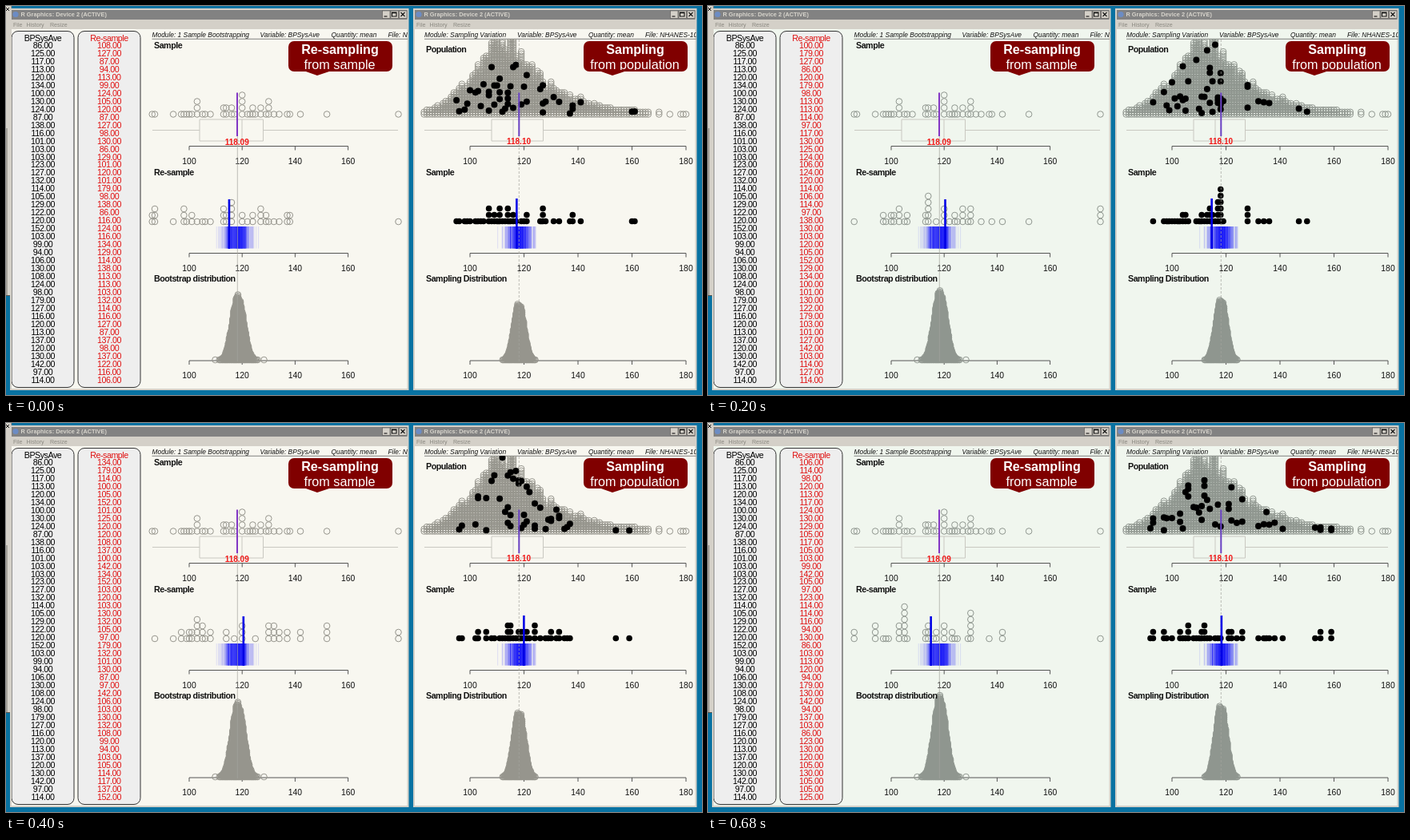
An HTML page that plays this animation: 870x487 px, repeating every 780 ms.

```html
<!DOCTYPE html>
<html lang="en">
<head>
<meta charset="utf-8">
<title>Bootstrap and sampling distributions</title>
<style>
html, body { margin: 0; width: 100%; height: 100%; overflow: hidden; background: #0872a2; }
svg { display: block; width: 870px; height: 487px; font-family: "Liberation Sans", Arial, sans-serif; }
.tight { letter-spacing: -0.045em; }
</style>
</head>
<body>
<svg id="stage" viewBox="0 0 870 487" xmlns="http://www.w3.org/2000/svg"></svg>
<script>
const NS = 'http://www.w3.org/2000/svg';
const stage = document.getElementById('stage');
const STEP = 40, LOOP = 780, STATES = 18;

// ---------- helpers ----------
function el(parent, tag, attrs = {}, text) {
  const node = document.createElementNS(NS, tag);
  for (const key in attrs) node.setAttribute(key, attrs[key]);
  if (text !== undefined) node.textContent = text;
  parent.appendChild(node);
  return node;
}
const rect = (p, x, y, w, h, fill, more) => el(p, 'rect', { x, y, width: w, height: h, fill, ...more });
const line = (p, x1, y1, x2, y2, stroke, w = 1, more) =>
  el(p, 'line', { x1, y1, x2, y2, stroke, 'stroke-width': w, ...more });
const path = (p, d, more) => el(p, 'path', { d, fill: 'none', ...more });
// y is the middle of the capital letters
const label = (p, s, x, y, size, more) =>
  el(p, 'text', { x, y: y + size * 0.36, 'font-size': size, fill: '#111', ...more }, s);
const mid = { 'text-anchor': 'middle' };
const bold = { 'font-weight': 'bold' };
const tight = { class: 'tight' };

function random(seed) {
  return () => {
    seed = (seed + 0x6D2B79F5) | 0;
    let t = Math.imul(seed ^ (seed >>> 15), 1 | seed);
    t = (t + Math.imul(t ^ (t >>> 7), 61 | t)) ^ t;
    return ((t ^ (t >>> 14)) >>> 0) / 4294967296;
  };
}
const gauss = rnd => Math.sqrt(-2 * Math.log(1 - rnd())) * Math.cos(2 * Math.PI * rnd());
const mean = list => list.reduce((a, b) => a + b, 0) / list.length;
const dot = (x, y, r = 3.8) =>
  `M${(x - r).toFixed(1)} ${y.toFixed(1)}a${r} ${r} 0 1 0 ${2 * r} 0a${r} ${r} 0 1 0 ${-2 * r} 0`;

const leftX = v => 229 + (v - 100) * 3.31;
const rightX = v => 580 + (v - 100) * 3.375;

function stacked(values, toX, base) {
  const seen = {};
  return values.map(v => {
    seen[v] = (seen[v] || 0) + 1;
    return dot(toX(v), base - (seen[v] - 1) * 8);
  }).join('');
}

// ---------- data ----------
const sample = ('86 125 117 113 120 134 100 130 124 87 138 116 101 103 103 123 127 132 114 105 129 122 ' +
  '120 152 103 99 94 106 130 108 124 98 179 127 116 120 113 137 120 130 142 97 114').split(' ').map(Number);

// height of the population pile at value v
const crowd = v => 97 * Math.exp(v < 115 ? -((v - 115) ** 2) / 338 : (115 - v) / 16);

function pickPopulation(rnd, count) {
  const picked = [];
  while (picked.length < count) {
    const v = 84 + Math.floor(rnd() * 83);
    if (rnd() * 97 < crowd(v)) picked.push(v);
  }
  return picked;
}

// ---------- windows ----------
const panels = [], greys = [];

function frameWindow(x, w, icon) {
  rect(stage, x, 3, w, 478, '#d4d0c8');
  rect(stage, x + 2, 5, w - 4, 12, '#828282');
  el(stage, 'circle', { cx: icon, cy: 10.5, r: 3.6, fill: '#6c8cc4' });
  label(stage, 'R Graphics: Device 2 (ACTIVE)', icon + 6.5, 10.5, 7.35, { fill: '#d8d5cd', ...bold });
  const b = x + w - 33;
  const glyphs = [`M${b + 2} 13h4`, `M${b + 12} 8h5.5v5h-5.5zM${b + 12} 8.6h5.5`, `M${b + 23} 8l5 5m0 -5l-5 5`];
  glyphs.forEach((d, i) => {
    rect(stage, b + i * 10.5, 6, 9.5, 9.5, '#d4d0c8', { stroke: '#55534f', 'stroke-width': 0.6 });
    path(stage, d, { stroke: '#111', 'stroke-width': 1.1 });
  });
  [['File', -3], ['History', 13.5], ['Resize', 43]].forEach(([s, dx]) =>
    label(stage, s, icon + dx, 23, 7.1, { fill: '#8b8981' }));
  panels.push(rect(stage, x + 2, 29, w - 4, 450, '#f8f7f0'));
}

rect(stage, 0, 0, 870, 487, '#0872a2');
rect(stage, 0, 0, 7, 363, '#d4d0c8');
line(stage, 6.8, 0, 6.8, 363, '#77746e', 0.8);
line(stage, 0, 362.5, 7, 362.5, '#55534f');
line(stage, 1, 153, 1, 362, '#77746e');
path(stage, 'M0 2l4 4m0 -4l-4 4', { stroke: '#111' });
frameWindow(5, 498.5, 12);
frameWindow(509, 354.5, 516);

const clip = (id, x, y, w, h) => rect(el(stage, 'clipPath', { id }), x, y, w, h, '#000');
clip('left', 7, 29, 495, 450);
clip('right', 511, 29, 351.5, 450);
clip('plot', 511, 41, 351, 110);
clip('note', 353, 44, 500, 36);
const left = el(stage, 'g', { 'clip-path': 'url(#left)' });
const right = el(stage, 'g', { 'clip-path': 'url(#right)' });

// ---------- value columns ----------
function column(x, head, fill) {
  const style = { fill, ...mid, ...tight };
  rect(left, x, 31.5, 78, 446, '#eeeeee', { rx: 8, stroke: '#333', 'stroke-width': 1 });
  label(left, head, x + 39, 40, 10.7, style);
  return sample.map((v, i) => label(left, v + '.00', x + 39, 49 + i * 9.976, 10.7, style));
}
column(7, 'BPSysAve', '#000');
const redCells = column(90, 'Re-sample', '#e01010');

// ---------- plots ----------
function header(p, module, xs, end) {
  [module, 'Variable: BPSysAve', 'Quantity: mean', 'File: NHANES-1000'].forEach((s, i) =>
    label(p, s, xs[i], 36, 8.4, { 'font-style': 'italic' }));
  line(p, xs[0], 41.3, end, 41.3, '#666', 0.8);
}
header(left, 'Module: 1 Sample Bootstrapping', [182.5, 317.5, 406.5, 477.5], 503);
header(right, 'Module: Sampling Variation', [523, 639, 728, 799], 863);

function axes(p, toX, last) {
  [175.5, 309.5, 444].forEach(y => {
    line(p, toX(100), y, toX(last), y, '#555');
    for (let v = 100; v <= last; v += 20) {
      line(p, toX(v), y, toX(v), y + 5, '#555');
      label(p, v, toX(v), y + 18.5, 10.4, mid);
    }
  });
}
axes(left, leftX, 160);
axes(right, rightX, 180);

function boxPlot(p, x1, x2, q1, med, q3) {
  path(p, `M${x1} 155.5H${q1}M${q3} 155.5H${x2}M${q1} 142H${q3}V169H${q1}ZM${med} 142V169`,
    { stroke: '#c9c8c1', 'stroke-width': 1 });
}
boxPlot(left, 183, 490, 242, 295, 321.5);
boxPlot(right, 523, 850, 607, 634, 671.5);

function hollow(p, d, more) {
  const node = path(p, d, { 'stroke-width': 1, ...more });
  greys.push(node);
  return node;
}
hollow(left, stacked(sample, leftX, 135.5));

function population() {
  const rnd = random(11);
  let d = '';
  for (let v = 83; v <= 180; v++) {
    if (v > 166 && rnd() < 0.6) continue;
    const top = Math.max(1, crowd(v) * (0.75 + rnd() * 0.4));
    for (let h = 0; h < top; h += 2.7) d += dot(rightX(v), 135.5 - h);
  }
  return d;
}
hollow(right, population(), { 'clip-path': 'url(#plot)' });
const chosen = path(right, '', { fill: '#000', 'clip-path': 'url(#plot)' });

// translucent trail left by earlier means
function strip(p, center, sd, seed) {
  const rnd = random(seed);
  for (let i = 0; i < 450; i++) {
    const x = center + gauss(rnd) * sd;
    line(p, x, 276, x, 303.5, '#2020ff', 1, { 'stroke-opacity': 0.12 });
  }
}
strip(left, 289.5, 9, 21);
strip(right, 641.3, 8, 34);

// bell of overlapping rings whose height grows with each draw
function bell(center, sd, height, seed) {
  const rnd = random(seed);
  let d = '';
  for (let dx = -3.1 * sd; dx <= 3.1 * sd; dx += 1.1) {
    const top = (height - 4) * Math.exp(-dx * dx / (2 * sd * sd)) * (0.92 + rnd() * 0.09);
    for (let h = 0; h <= top; h += 1.7) d += dot(center + dx, 443 - h);
  }
  return d;
}
const leftBell = hollow(left, '');
const rightBell = hollow(right, '');
hollow(left, dot(261.5, 443) + dot(314.5, 443) + dot(322.5, 443));

const redraw = hollow(left, '');
const picks = path(right, '', { fill: '#000' });

line(left, 289.3, 163, 289.3, 445, '#a4a49e', 0.7);
line(right, 641.3, 42, 641.3, 445, '#a4a49e', 0.7, { 'stroke-dasharray': '3 2' });
line(left, 289, 108.5, 289, 163, '#8236c4', 2);
line(right, 641.3, 108.5, 641.3, 163, '#6a42c4', 2);
label(left, '118.09', 288.7, 170, 10, { fill: '#f01818', ...bold, ...mid });
label(right, '118.10', 641, 169.8, 10, { fill: '#f01818', ...bold, ...mid });

const leftMean = line(left, 0, 242, 0, 304, '#0000e6', 2.6);
const rightMean = line(right, 0, 241, 0, 304, '#0000e6', 2.6);

[[left, 185, ['Sample', 49], ['Re-sample', 208], ['Bootstrap distribution', 341.5]],
 [right, 525, ['Population', 54.5], ['Sample', 208], ['Sampling Distribution', 341.5]]]
  .forEach(([p, x, ...titles]) => titles.forEach(([s, y]) =>
    label(p, s, x, y, 10.7, { ...bold, ...tight })));

function callout(p, x, top, bottom) {
  rect(p, x, 44, 130, 38, '#800000', { rx: 7 });
  path(p, `M${x + 19} 81h35l-18 6z`, { fill: '#800000' });
  const g = el(p, 'g', { 'clip-path': 'url(#note)' });
  label(g, top, x + 64.5, 54, 16.1, { fill: '#fff', ...bold, ...mid });
  label(g, bottom, x + 64, 73.5, 16.2, { fill: '#fff', ...mid });
}
callout(left, 353, 'Re-sampling', 'from sample');
callout(right, 722, 'Sampling', 'from population');

// ---------- animation ----------
const views = Array.from({ length: STATES }, (_, step) => {
  const rnd = random(step * 97 + 5);
  const resample = sample.map(() => sample[Math.floor(rnd() * sample.length)]);
  const picked = pickPopulation(rnd, 45);
  return {
    resample,
    leftDots: stacked(resample, leftX, 270),
    rightDots: stacked(picked, rightX, 269.5),
    spots: picked.map(v => dot(rightX(v), 134.5 - rnd() ** 1.3 * Math.max(0, crowd(v) - 3), 4)).join(''),
    leftAvg: leftX(mean(resample)),
    rightAvg: rightX(mean(picked)),
    leftBell: bell(290, 7.5, 86 + 1.2 * step, 51),
    rightBell: bell(641.3, 6.6, 77 + 1.15 * step, 62),
    green: (step > 2 && step < 7) || step === STATES - 1
  };
});

function show(step) {
  const s = views[step];
  redCells.forEach((cell, i) => { cell.textContent = s.resample[i] + '.00'; });
  redraw.setAttribute('d', s.leftDots);
  picks.setAttribute('d', s.rightDots);
  chosen.setAttribute('d', s.spots);
  leftBell.setAttribute('d', s.leftBell);
  rightBell.setAttribute('d', s.rightBell);
  for (const [node, x] of [[leftMean, s.leftAvg], [rightMean, s.rightAvg]]) {
    node.setAttribute('x1', x);
    node.setAttribute('x2', x);
  }
  panels.forEach(p => p.setAttribute('fill', s.green ? '#f0f6ee' : '#f8f7f0'));
  greys.forEach(p => p.setAttribute('stroke', s.green ? '#8f968f' : '#96958d'));
}

const start = performance.now();
let shown = -1;
function tick() {
  const t = (performance.now() - start) % LOOP;
  const step = Math.min(STATES - 1, Math.floor(t / STEP));
  if (step !== shown) show(shown = step);
  requestAnimationFrame(tick);
}
tick();
</script>
</body>
</html>
```
